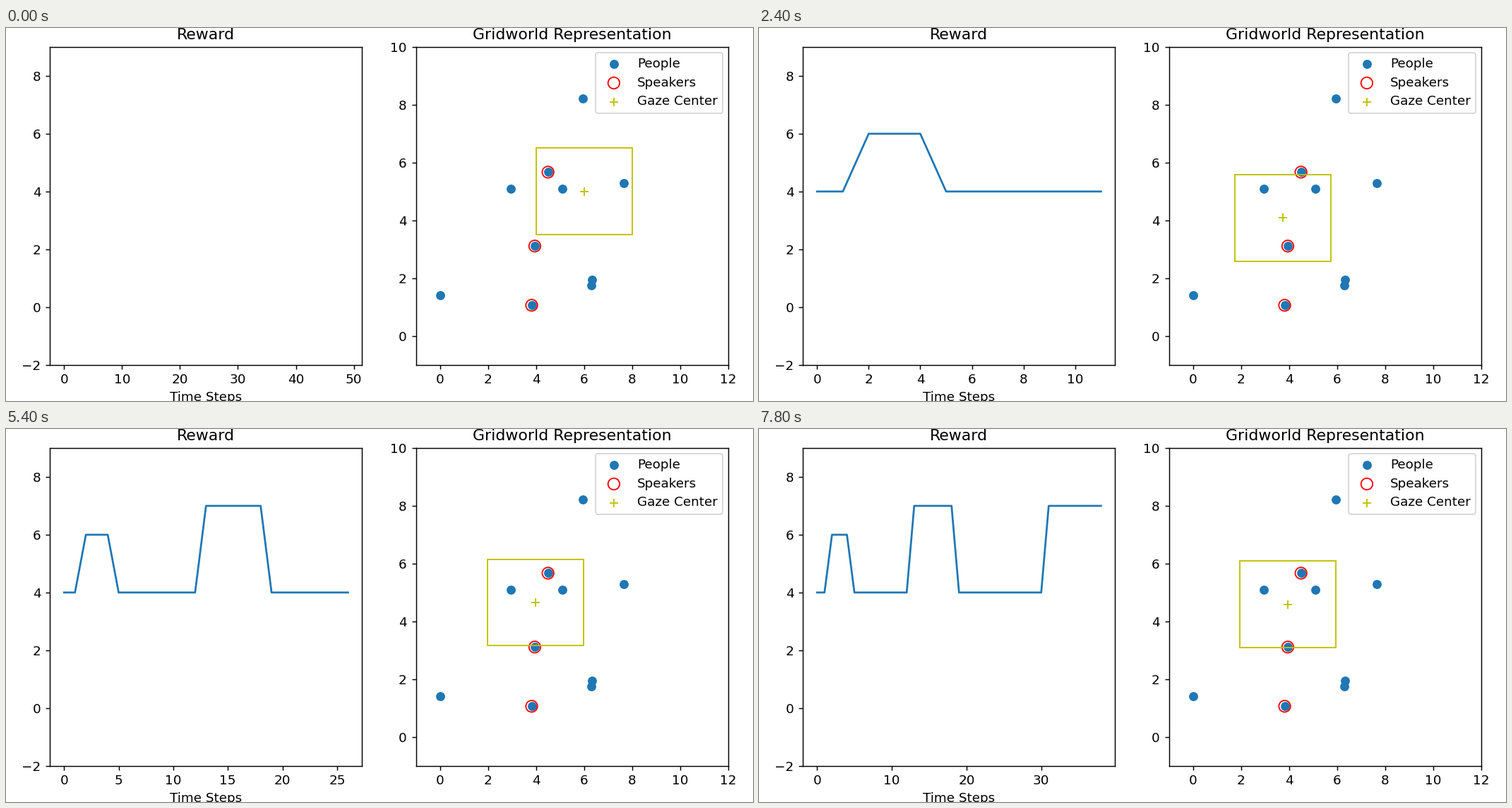
Recreate the animation shown at these times as a matplotlib script. Size 1058 by 529 pixels, loop 8 s.

```python
import numpy as np
import matplotlib.pyplot as plt
from matplotlib.animation import FuncAnimation
from matplotlib.patches import Rectangle

W, H, DPI = 1058, 529, 132.25
FRAMES, INTERVAL = 40, 200
VIEW = np.array([4, 3])
SPEAKER_VALUE = 2.5

SPEAKERS = np.array([(4.50, 5.67), (3.95, 3.11), (3.82, 1.06)])
LISTENERS = np.array([(0.02, 1.40), (2.95, 5.09), (5.11, 5.09), (7.64, 5.30),
                      (5.96, 8.21), (6.34, 1.95), (6.29, 1.75)])

# Gaze waypoints: step, x, y
WAYPOINTS = np.array([
    (0, 6.00, 5.00), (4, 5.14, 4.20), (8, 4.26, 3.77), (12, 3.74, 4.09),
    (17, 3.79, 4.55), (23, 3.95, 4.68), (31, 3.98, 4.605), (39, 3.955, 4.59),
])


def smooth(t, knots, values):
    """Cubic Hermite curve through the knots."""
    slopes = np.gradient(values, knots)
    i = np.clip(np.searchsorted(knots, t, side="right") - 1, 0, len(knots) - 2)
    h = knots[i + 1] - knots[i]
    u = (t - knots[i]) / h
    return ((2 * u**3 - 3 * u**2 + 1) * values[i]
            + (u**3 - 2 * u**2 + u) * h * slopes[i]
            + (3 * u**2 - 2 * u**3) * values[i + 1]
            + (u**3 - u**2) * h * slopes[i + 1])


def count_seen(points, gaze):
    return np.sum(np.all(np.abs(points - gaze) <= VIEW / 2, axis=1))


def score(gaze):
    """Whole points for everyone in view; speakers are worth more."""
    return int(SPEAKER_VALUE * count_seen(SPEAKERS, gaze)
               + count_seen(LISTENERS, gaze))


steps = np.arange(FRAMES)
knots, *coords = WAYPOINTS.T
path = np.column_stack([smooth(steps, knots, c) for c in coords])
reward = [score(gaze) for gaze in path]

fig = plt.figure(figsize=(W / DPI, H / DPI), dpi=DPI, facecolor="white")


def add_panel(left, title):
    top, bottom, width = 27.1, 477.6, 442.4
    ax = fig.add_axes([left / W, 1 - bottom / H, width / W, (bottom - top) / H])
    ax.set_title(title)
    return ax


chart = add_panel(62.1, "Reward")
chart.set_xlabel("Time Steps", labelpad=3.5)
chart.set_ylim(-2, 9)
line, = chart.plot([], [], color="C0")

grid = add_panel(580.5, "Gridworld Representation")
grid.set_xlim(-1, 12)
grid.set_ylim(-1, 10)
grid.scatter(*np.vstack([SPEAKERS, LISTENERS]).T, color="C0", label="People")
grid.scatter(*SPEAKERS.T, s=80, facecolors="none", edgecolors="r",
             label="Speakers")
center = grid.scatter(*path[0], marker="+", color="y", linewidths=1,
                      label="Gaze Center")
view = grid.add_patch(Rectangle((0, 0), *VIEW, fill=False,
                                edgecolor="y", linewidth=1))
grid.legend(loc="upper right", labelspacing=0.47, borderaxespad=0.42)


def time_span(n):
    """Range of the time axis before its margins."""
    if n == 0:
        return 0, 49
    if n == 1:
        return -0.05, 0.05
    return 0, n - 1


def update(n):
    line.set_data(steps[:n], reward[:n])
    low, high = time_span(n)
    margin = 0.05 * (high - low)
    chart.set_xlim(low - margin, high + margin)

    center.set_offsets([path[n]])
    view.set_xy(path[n] - VIEW / 2)
    return line, center, view


anim = FuncAnimation(fig, update, frames=FRAMES, interval=INTERVAL,
                     init_func=lambda: update(0), repeat=True, repeat_delay=0)
plt.show()
```
